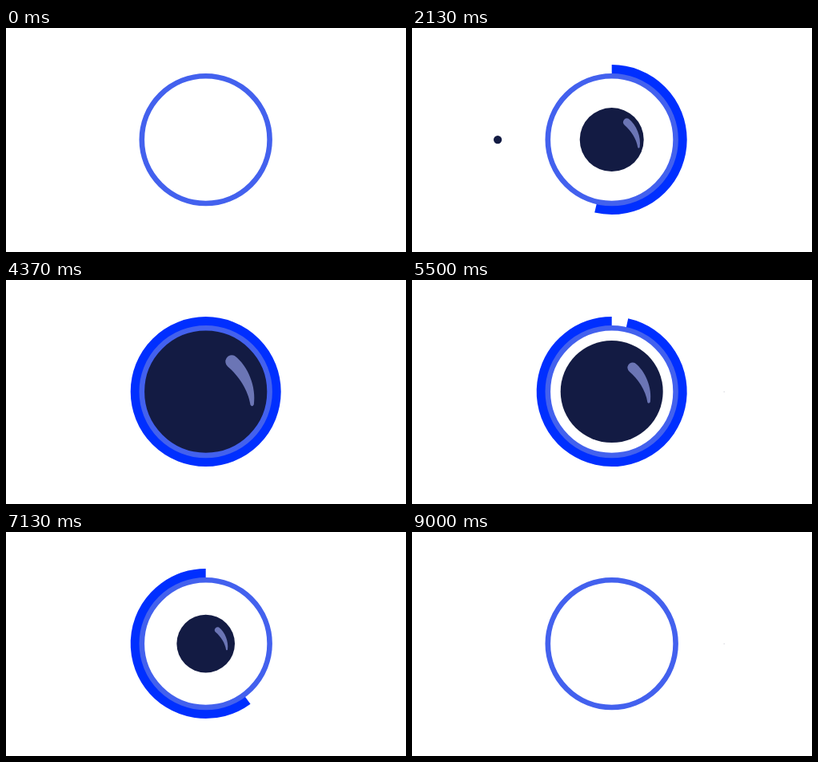
Animation of 500 by 281 pixels, one loop 9.03 s. Source, as an HTML page with a canvas:

```html
<!DOCTYPE html>
<html lang="en">
<head>
<meta charset="utf-8">
<title>Filling eye</title>
<style>
  html, body { margin: 0; width: 100%; height: 100%; overflow: hidden; background: #fff; }
  canvas { display: block; width: 100vw; height: 100vh; }
</style>
</head>
<body>
<canvas id="stage" width="500" height="281"></canvas>
<script>
const ctx = document.getElementById('stage').getContext('2d');
const LOOP = 9030, DOTS = 8, PERIOD = 500, FLIGHT = 433;
const FILL_START = 65, DRAIN_START = 5072;
const CX = 249.7, CY = 140.1, TAU = Math.PI * 2;
const DARK = '#131b43', RING = '#4361ee', ARC = '#002fff', SHINE = '#6b75b5';
const shine = new Path2D(
  'M33.5-42C49.5-30 59-5 56 15Q54 18.5 52 15.5C49.5-2 38-19 25.5-29.5A7.5 7.5 0 0 1 33.5-42Z');

const clamp = u => Math.max(0, Math.min(1, u));
const span = (t, start, length) => clamp((t - start) / length);

// Cubic from 0 to 1 with the given slopes at both ends.
function ease(u, a = 0, b = 0) {
  return a * u * (1 - u) ** 2 + u * u * (3 - 2 * u) - b * u * u * (1 - u);
}

function disc(x, y, r, color) {
  ctx.fillStyle = color;
  ctx.beginPath();
  ctx.arc(x, y, r, 0, TAU);
  ctx.fill();
}

function arc(r, width, from, to, color) {
  ctx.strokeStyle = color;
  ctx.lineWidth = width;
  ctx.beginPath();
  ctx.arc(CX, CY, r, from * TAU - TAU / 4, to * TAU - TAU / 4);
  ctx.stroke();
}

// The first and last changes are 16 px, the ones between are 8 px.
function pupilRadius(t) {
  let r = 0;
  for (let i = 0; i < DOTS; i++) {
    const arrival = FILL_START + FLIGHT + i * PERIOD;
    const departure = DRAIN_START + i * PERIOD;
    const edge = i === 0 || i === DOTS - 1;
    const length = i === DOTS - 1 ? 200 : 125;
    r += (edge ? 16 : 8) * (ease(span(t, arrival - 90, length)) - ease(span(t, departure, 125)));
  }
  return r;
}

// age is the time to or from the outer end of the path.
function drawDot(age, outerX) {
  if (age <= 0 || age >= FLIGHT) return;
  const travel = ease(age / FLIGHT, 0.316, 0.651);
  disc(outerX + (CX - outerX) * travel, CY, 16 * Math.min(1, age / 205), DARK);
}

function draw(t) {
  ctx.setTransform(1, 0, 0, 1, 0, 0);
  ctx.fillStyle = '#fff';
  ctx.fillRect(0, 0, 500, 281);

  const pulse = 1 + 0.3 * Math.sin(Math.PI * span(t, 4033, 334)) ** 2;
  ctx.translate(CX, CY);
  ctx.scale(pulse, pulse);
  ctx.translate(-CX, -CY);

  for (let i = 0; i < DOTS; i++) {
    drawDot(t - FILL_START - i * PERIOD, 94);
    drawDot(DRAIN_START + FLIGHT + i * PERIOD - t, 390.5);
  }

  const head = ease(span(t, 33, 4000));
  const tail = ease(span(t, 5033, 3967), 0.124, 1.207);
  if (head > tail) arc(87.2, 13.6, tail, head, ARC);

  const r = pupilRadius(t);
  if (r > 0.1) {
    disc(CX, CY, r, DARK);
    const size = r / (64 + 10.5 * ease(span(t, 3910, 200)));
    ctx.save();
    ctx.translate(CX, CY);
    ctx.scale(size, size);
    ctx.fillStyle = SHINE;
    ctx.fill(shine);
    ctx.restore();
  }
  arc(79.9, 6.6, 0, 1, RING);
}

const begin = performance.now();
function tick() {
  draw((performance.now() - begin) % LOOP);
  requestAnimationFrame(tick);
}
tick();
</script>
</body>
</html>
```
